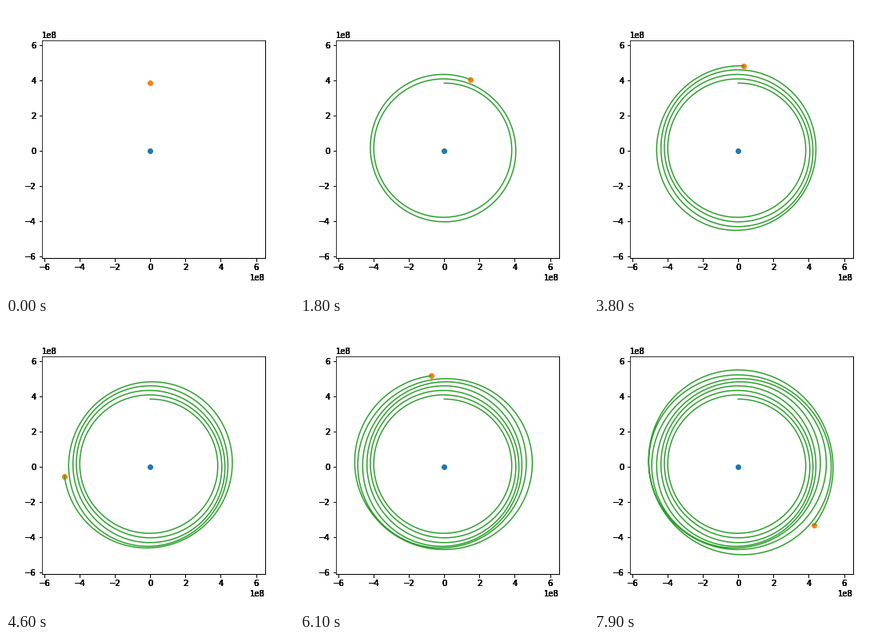
These frames come from a looping animation (360x360 px, 8 s). A matplotlib script:

```python
import numpy as np
import matplotlib.pyplot as plt
from matplotlib.animation import FuncAnimation

plt.rcParams.update({"font.family": "DejaVu Sans", "font.size": 10})

G = 6.674e-11
SUN, EARTH, MOON = 1.989e30, 5.972e24, 7.348e22
SUN_DIST, MOON_DIST = 1.496e11, 3.844e8
DT = 1800                  # seconds per step
STEPS = 160                # steps per frame
FRAMES = 80

UNIT = 1e8
SCALE = 22.05              # pixels per UNIT
CENTER = (180.25, 181.1)   # planet position in pixels
BOX = (45, 324, 43.2, 315)  # axes edges: left, right, top, bottom


def pull(mass, d):
    """Acceleration towards a mass at offset d."""
    return G * mass * d / abs(d)**3


def simulate(count):
    """Moon positions relative to the planet, by explicit Euler steps."""
    earth = 1j * SUN_DIST
    moon = earth + 1j * MOON_DIST
    earth_v = complex(np.sqrt(G * SUN / SUN_DIST))
    moon_v = earth_v + complex(np.sqrt(G * EARTH / MOON_DIST))
    path = np.empty(count, complex)
    for i in range(count):
        d = moon - earth
        path[i] = d
        earth_a = pull(SUN, -earth) + pull(MOON, d)
        moon_a = pull(SUN, -moon) + pull(EARTH, -d)
        earth, moon = earth + earth_v * DT, moon + moon_v * DT
        earth_v, moon_v = earth_v + earth_a * DT, moon_v + moon_a * DT
    return path


def add_axes(z):
    left, right, top, bottom = BOX
    ax = fig.add_axes([left / 360, 1 - bottom / 360,
                       (right - left) / 360, (bottom - top) / 360], zorder=z)
    ticks = np.arange(-6, 7, 2) * UNIT
    ax.set_xticks(ticks)
    ax.set_yticks(ticks)
    k = UNIT / SCALE
    ax.set_xlim((left - CENTER[0]) * k, (right - CENTER[0]) * k)
    ax.set_ylim((CENTER[1] - bottom) * k, (CENTER[1] - top) * k)
    return ax


path = simulate((FRAMES - 1) * STEPS + 1)

fig = plt.figure(figsize=(5, 5), dpi=72, facecolor="white")
# Stacked axes give the labels their heavy, hard edges
for z in range(7):
    ax = add_axes(z)

ax.plot([0], [0], "o", color="C0")
moon_dot, = ax.plot([], [], "o", color="C1")
trail, = ax.plot([], [], color="C2", lw=1.5)


def update(i):
    part = path[:i * STEPS + 1]
    moon_dot.set_data(part.real[-1:], part.imag[-1:])
    trail.set_data(part.real, part.imag)
    return moon_dot, trail


anim = FuncAnimation(fig, update, frames=FRAMES, interval=100,
                     repeat=True, repeat_delay=0, blit=False)
plt.show()
```
